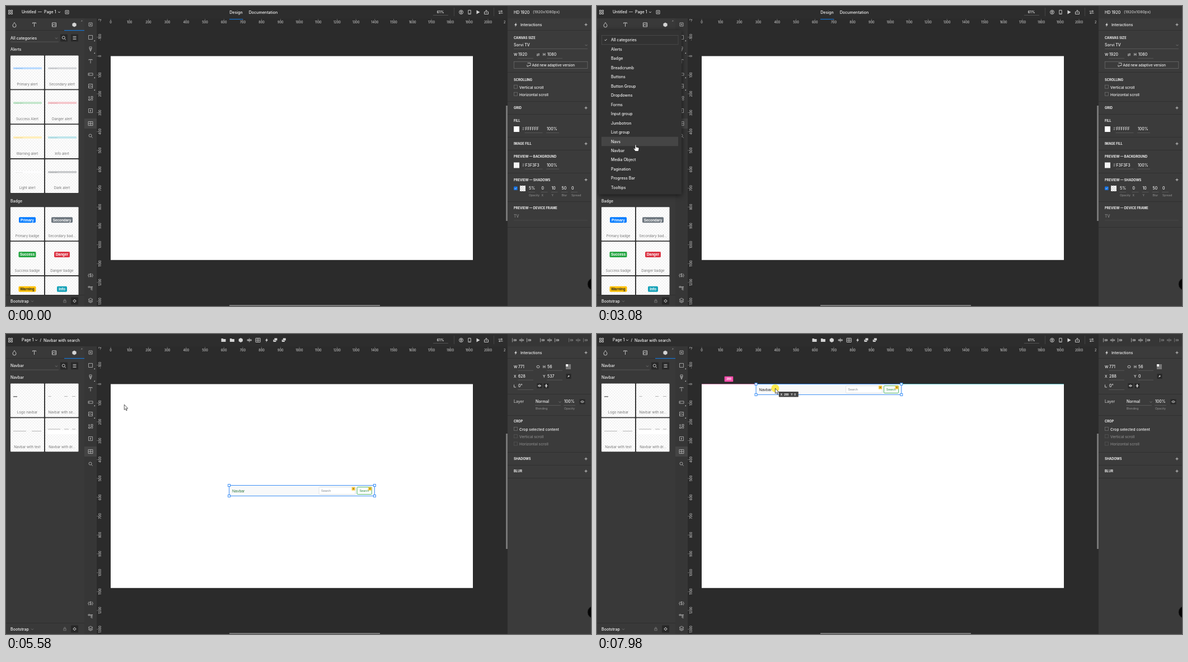
An HTML page that plays this animation: 1045x536 px, repeating every 8000 ms.

```html
<!DOCTYPE html>
<html lang="en">
<head>
<meta charset="utf-8">
<title>Design editor</title>
<style>
html, body { margin: 0; width: 100%; height: 100%; overflow: hidden; background: #2b2b2b; }
svg { display: block; width: 100%; height: 100%; }
text { font-family: Inter, "Open Sans", sans-serif; font-weight: 500; fill: #f4f4f4; white-space: pre; }
.dim { fill: #8b8b8b; }
.soft { fill: #c4c4c4; }
.off { fill: #888; }
.bold { font-weight: 700; }
.mid { text-anchor: middle; }
.tile { fill: #777; text-anchor: middle; font-weight: 400; }
.ui { font-family: "Liberation Sans", Arial, sans-serif; font-weight: 400; }
.ui.bold { font-weight: 700; }
.i { fill: none; stroke: #d4d4d4; stroke-width: .9; }
.f { fill: #d4d4d4; stroke: none; }
.muted { opacity: .75; }
.faint { opacity: .4; }
</style>
</head>
<body>
<svg id="stage" viewBox="0 0 1045 536" preserveAspectRatio="none"></svg>
<script>
const LOOP = 8000, STEP = 77.75, FIRST = 125;
const PAGE = { x: 187, y: 89.5, w: 647, h: 364.3 };
const SCALE = PAGE.w / 1920;

const text = (x, y, s, size = 6.9, cls = '', extra = '') =>
  `<text x="${x}" y="${y + size * .36}" font-size="${size}" class="${cls}" ${extra}>${s}</text>`;
const rect = (x, y, w, h, fill, extra = '') =>
  `<rect x="${x}" y="${y}" width="${w}" height="${h}" fill="${fill}" ${extra}/>`;
const icon = (x, y, d, cls = '') => `<path transform="translate(${x} ${y})" d="${d}" class="i ${cls}"/>`;
const group = (id, body, extra = '') => `<g id="${id}" ${extra}>${body}</g>`;
const range = n => [...Array(n).keys()];

const D = {
  grid: 'M-3.5-3.5h2.7v2.7h-2.7zM.8-3.5h2.7v2.7h-2.7zM-3.5.8h2.7v2.7h-2.7zM.8.8h2.7v2.7h-2.7z',
  chevron: 'M-2-1L0 1L2-1',
  plus: 'M-2.5 0h5M0-2.5v5',
  box: 'M-3.5-3.5h7v7h-7z',
  plusBox: 'M-3-3h6v6h-6zM-1.5 0h3M0-1.5v3',
  bolt: 'M1-4L-2.5 .7H-.3L-1 4L2.5-.9H.4z',
  drop: 'M0-4C2-1 3 0 3 1.5a3 3 0 0 1-6 0C-3 0-2-1 0-4z',
  type: 'M-3-2v-1.5h6V-2M0-3.5v7',
  image: 'M-3.5-3.5h7v7h-7zM-3.5 2l2.5-3l2 2l1-1l1.5 1.5M1-2h.8',
  hex: 'M0-4L3.6-2V2L0 4L-3.6 2V-2z',
  search: 'M2-.5a2.5 2.5 0 1 1-5 0a2.5 2.5 0 0 1 5 0M1.3 1.3L3.7 3.7',
  menu: 'M-3-2.5h6M-3 0h6M-3 2.5h6',
  person: 'M3.5 0a3.5 3.5 0 1 1-7 0a3.5 3.5 0 0 1 7 0M-2-1h4M0-2.3v2.5L-1.3 2.5M0 .2L1.3 2.5',
  phone: 'M-2.2-3.5h4.4v7h-4.4zM-.6 2.3h1.2',
  play: 'M-2.5-3.5L3.5 0L-2.5 3.5z',
  share: 'M-1.5-.5h-2v4h7v-4h-2M0 1.5v-5M-1.8-1.8L0-3.6L1.8-1.8',
  sliders: 'M-4-1.7h7M1.2-3.3L3-1.7L1.2 0M4 1.7h-7M-1.2.2L-3 1.7L-1.2 3.3',
  pen: 'M-2-4h4v3L0 4L-2-1zM-2-1h4M0-1v3',
  field: 'M-4-2h8v4h-8zM-2.5-.8v1.6',
  shapes: 'M-4-3.5L-1-.8M-1-3.5L-4-.8M1-3.5h3v3h-3zM-3.5 1h3v2.5h-3zM4 2.2a1.4 1.4 0 1 1-2.8 0a1.4 1.4 0 0 1 2.8 0',
  cells: 'M-4-3.5h8v7h-8zM0-3.5v7M-4 0h8',
  tree: 'M-4-3h3v2h-3zM1-2h3M-1-2h5M1-2V3h3M1 .5h3',
  layers: 'M0-4L4-1.7L0 .5L-4-1.7zM-4 .3L0 2.5L4 .3M-4 2L0 4.2L4 2',
  folder: 'M-4-3h3l1 1h4v5h-8z',
  copies: 'M-1.5-3.5h5v4h-5zM-3.5-1h1.5v2h3.5v2h-5z',
  align: 'M-3.5-3.5v7M-1.5 0h5M-1.5-1.2h5v2.4h-5',
  center: 'M0-3.5v7M-3.5-1h2.3v2h-2.3zM1.2-1h2.3v2h-2.3z',
  eye: 'M-3 0Q0-3.2 3 0Q0 3.2-3 0M-.6 0h1.2',
  lock: 'M-2.2-.3h4.4v3h-4.4zM-1.3-.3v-1.4a1.3 1.3 0 0 1 2.6 0v1.4',
  gear: 'M2 0a2 2 0 1 1-4 0a2 2 0 0 1 4 0M0-3v1M0 2v1M-3 0h1M2 0h1',
  swap: 'M-2.5-1h5L1-2.5M2.5 1h-5L-1 2.5',
  link: 'M-2.5 0a2 1.7 0 0 1 5 0a2 1.7 0 0 1-5 0'
};

const rule = (x1, x2, y, color = '#626262') => rect(x1, y, x2 - x1, .7, color);
const darkBox = (x, y) => rect(x, y, 13, 13, '#282828', 'rx="1"');
const field = (x, y, value, w, id = '') => text(x, y, value, 6.9, '', id && `id="${id}"`) + rule(x - 1, x + w, y + 6.3);
const check = (y, label, cls = '') =>
  rect(907.4, y - 4, 6, 6, 'none', 'stroke="#777" stroke-width=".7"' + (cls ? ' opacity=".5"' : '')) + text(917, y, label, 6.7, cls);
const heading = (y, label, plus) => text(907, y, label, 5.75, 'bold') + (plus ? icon(1036, y, D.plus) : '');
const dividers = ys => ys.map(y => rect(896, y, 149, 1, '#303030')).join('');

function workspace() {
  const rulerX = range(21).map(n => {
    const x = PAGE.x + n * 100 * SCALE;
    return rect(x - .3, 23, .7, 3, '#777') + text(x, 29.5, n * 100, 5.5, 'soft mid');
  }).join('') + text(889, 29.5, '2', 5.5, 'soft');
  const rulerY = range(16).map(i => {
    const n = i - 2, y = PAGE.y + n * 100 * SCALE;
    return rect(162, y - .3, 3, .7, '#777') +
      text(0, 0, n * 100, 5.5, 'soft mid', `transform="translate(168.5 ${y})rotate(-90)"`);
  }).join('');
  return rect(0, 0, 1045, 536, '#2b2b2b') + rulerX + `<g clip-path="url(#below)">${rulerY}</g>` +
    rect(PAGE.x, PAGE.y, PAGE.w, PAGE.h, '#fff') +
    rect(893, 178, 3, 206, '#777') + rect(399, 534, 269, 2, '#777');
}

function toolbar() {
  const tools = [[33, 'plusBox'], [56, 'box'], [77, 'pen'], [99, 'type'], [122, 'field'], [143, 'image'],
    [165, 'shapes'], [187, 'box'], [210, 'cells'], [232, 'search'], [504, 'tree'], [526, 'layers']];
  return rect(140, 22, 22, 514, '#363636') + rect(140, 201, 22, 18, '#444') +
    tools.map(([y, name]) => icon(151, y, D[name], 'muted')).join('') + icon(151, 187, 'M.8-2L-1 .3H1L-.8 2', 'muted') +
    text(151, 482, '{$}', 6.9, 'mid soft') +
    [62, 84, 128, 150].map(y => icon(158, y, 'M-1 1h2v-2z', 'f')).join('');
}

function topBar() {
  const shared = rect(0, 0, 896, 22, '#2d2d2d') + icon(8, 11, D.grid) +
    text(776, 11, '61%', 6.2, 'mid') + rule(763, 790, 16) +
    rect(800, 3, 1, 15, '#444') + rect(871, 3, 1, 15, '#444') +
    icon(813, 11, D.person) + icon(828, 11, D.phone) + icon(843, 11, D.play, 'f') +
    icon(858, 11, D.share) + icon(883.5, 11, D.sliders);
  const idle = text(28, 11, 'Untitled') + text(57, 11, '—') + text(68, 11, 'Page 1') +
    icon(95, 11, D.chevron) + icon(109, 11, D.plusBox) +
    text(411, 11, 'Design', 7.1, 'mid') + text(459.5, 11, 'Documentation', 7.1, 'mid') +
    rect(399, 23, 24, 1.2, '#1474d4');
  const actions = ['folder', 'folder', 'hex', 'center', 'cells', 'bolt', 'copies', 'copies'];
  const picked = text(28, 11, 'Page 1') + icon(54, 11, D.chevron) + text(60.5, 11, '/') +
    text(67, 11, 'Navbar with search', 7) +
    actions.map((a, i) => icon(388.5 + i * 15.4, 11, D[a], a === 'center' || a === 'cells' ? '' : 'f')).join('');
  return shared + group('topIdle', idle) + group('topPicked', picked);
}

const tile = (col, row, top, label) => {
  const x = 8 + col * 62, y = top + row * 61.8;
  return rect(x, y, 60 - col * .5, 60, 'url(#checker)', 'rx="1"') + text(x + 30, y + 51.3, label, 6.15, 'tile');
};

function leftPanel() {
  const alerts = [['Primary alert', '#b8daff', '#5b8fc4'], ['Secondary alert', '#d6d8db', '#8a8d90'],
    ['Success Alert', '#c3e6cb', '#71a97f'], ['Danger alert', '#f5c6cb', '#c07a82'],
    ['Warning alert', '#ffeeba', '#c9ad5e'], ['Info alert', '#bee5eb', '#6ba5ae'],
    ['Light alert', '#fdfdfe', '#c4c4c4'], ['Dark alert', '#c6c8ca', '#77797b']];
  const badges = [['Primary', '#007bff', 30], ['Secondary', '#6c757d', 38], ['Success', '#28a745', 31],
    ['Danger', '#dc3545', 28], ['Warning', '#ffc107', 31], ['Info', '#17a2b8', 18]];
  const all = text(8, 57, 'All categories', 7.2) + text(8, 78, 'Alerts') + text(8, 349, 'Badge') +
    alerts.map(([label, color, ink], i) => {
      const col = i % 2, row = i >> 1, x = 13 + col * 62, y = 109.5 + row * 61.8;
      return tile(col, row, 88.5, label) + rect(x, y, 51, 3.6, color, 'rx=".5"') +
        text(x + 1.5, y + 1.8, 'A simple alert', 2.5, 'ui', `style="fill:${ink}"`);
    }).join('') +
    badges.map(([label, color, w], i) => {
      const col = i % 2, row = i >> 1, x = 38 + col * 62, y = 382.2 + row * 61.8;
      const name = label === 'Secondary' ? 'Secondary bad...' : label + ' badge';
      const ink = label === 'Warning' ? '#212529' : '#fff';
      return tile(col, row, 359.3, name) + rect(x - w / 2, y - 5, w, 10, color, 'rx="1.7"') +
        text(x, y, label, 6.4, 'ui bold mid', `style="fill:${ink}"`);
    }).join('');
  const names = ['Logo navbar', 'Navbar with se...', 'Navbar with text', 'Navbar with dr...'];
  const dash = (x, w, y) => rect(x, y, w, 1, '#b4b4b4');
  const previews = rect(13, 111, 7, 1.6, '#777') + dash(75.5, 5, 111) + dash(104, 6, 111) + dash(118, 6, 111) +
    dash(13, 23, 173) + dash(46, 17, 173) + rect(71, 172, 58, 7, '#fff') +
    dash(75, 22, 169.5) + dash(104, 8, 169.5) + dash(118, 6, 169.5);
  const navbars = text(8, 57, 'Navbar') + text(8, 78, 'Navbar') +
    names.map((n, i) => tile(i % 2, i >> 1, 88.5, n)).join('') + group('previews', previews);
  return rect(0, 22, 140, 514, '#393939') + group('allTiles', all) + group('navTiles', navbars) +
    icon(15, 33.5, D.drop) + icon(50.5, 33.5, D.type) + icon(86, 33.5, D.image) + icon(122, 33.5, D.hex, 'f') +
    icon(135, 27, 'M-1 1L1-1M-.5-1H1V.5', 'faint') +
    rect(0, 43, 140, .8, '#2b2b2b') + rect(104, 43, 36, 1.2, '#1474d4') +
    rule(8, 94, 63.7) + icon(90, 57.5, D.chevron, 'faint') +
    darkBox(97, 50.5) + icon(103.3, 57, D.search) + darkBox(116, 50.5) + icon(122.5, 57, D.menu) +
    rect(0, 516, 140, 20, '#393939') + rect(0, 516, 140, .8, '#2e2e2e') +
    text(8, 527, 'Bootstrap', 7.1) + icon(47, 527.5, D.chevron, 'faint') +
    icon(105, 527, D.lock, 'faint') + darkBox(116, 520.5) + icon(122.5, 527, D.gear);
}

function rightPanel() {
  const swatch = (y, color, hex) => rect(907, y - 5, 10, 10, color) + text(922, y, '#', 6.9, 'dim') +
    field(927.5, y, hex, 31) + field(966, y, '100%', 22);
  const shadow = [[934, '5%', 'Opacity'], [956.5, '0', 'X'], [974.5, '10', 'Y'], [992.5, '50', 'Blur'], [1010, '0', 'Spread']];
  const idle = text(907, 11, 'HD 1920', 7) + text(941, 11, '(1920x1080px)', 6.8, 'soft') +
    heading(56.5, 'CANVAS SIZE') + text(907, 69.5, 'Sorvi TV', 7) + rule(907, 1039, 76) +
    icon(1036.5, 70, D.chevron, 'faint') +
    text(907, 87, 'W', 6.4) + field(915, 87, '1920', 27) + icon(950.5, 87, D.swap) +
    text(959, 87, 'H', 6.4) + field(967, 87, '1080', 27) +
    rect(907.3, 99.3, 131.5, 12.3, 'none', 'stroke="#707070" stroke-width=".7"') +
    icon(934, 105, 'M-2.5-3h5.5v4.5h-4M-3 0v3h2.5') + text(939.5, 105.3, 'Add new adaptive version', 6.2) +
    heading(132, 'SCROLLING') + check(145.2, 'Vertical scroll') + check(158.2, 'Horizontal scroll') +
    heading(182, 'GRID', 1) + heading(204.5, 'FILL') + swatch(220, '#fff', 'FFFFFF') +
    heading(246, 'IMAGE FILL', 1) + heading(269, 'PREVIEW — BACKGROUND') + swatch(284.5, '#f3f3f3', 'F3F3F3') +
    heading(310.5, 'PREVIEW — SHADOWS', 1) + rect(907, 322.5, 6.6, 6.6, '#1474e8', 'rx="1"') +
    icon(910.3, 325.8, 'M-1.7 0L-.5 1.3L1.8-1.3') + rect(918, 321, 10, 10, 'url(#checkerDark)') +
    shadow.map(([x, v, l]) => field(x, 326, v, 11) + text(x, 338, l, 5.1, 'dim')).join('') +
    heading(361, 'PREVIEW — DEVICE FRAME') + text(907, 376, 'TV', 6.9, 'dim') + rule(907, 1039, 382.5, '#4c4c4c') +
    dividers([118, 170, 193, 234, 257, 298, 349, 395]);
  const aligns = [908, 921, 934, 958, 971, 984, 1009, 1022, 1035];
  const picked = aligns.map((x, i) => icon(x, 11, D[i % 3 === 1 ? 'center' : 'align'], i > 5 ? 'faint' : 'muted')).join('') +
    text(907, 58.5, 'W', 6.4) + field(915, 58.5, '771', 27) + icon(950.5, 58.5, D.link) +
    text(959, 58.5, 'H', 6.4) + field(967, 58.5, '56', 27) +
    rect(1000, 54, 9, 9, '#777') + rect(1000, 54, 4, 4, '#fff') +
    text(907, 75.5, 'X', 6.4) + field(915, 75.5, '628', 27, 'valueX') +
    text(959, 75.5, 'Y', 6.4) + field(967, 75.5, '537', 27, 'valueY') +
    rect(1000.5, 71, 9, 9, '#282828') + icon(1005, 75.5, 'M-2 2L0-2L2 0z', 'f') +
    icon(909, 93, 'M-1.5-2.5V2H2') + field(915, 92.7, '0°', 27) +
    rect(948.5, 88, 9, 9, '#282828') + icon(953, 92.5, 'M0-2.5v5M-1-1L-3 0L-1 1zM1-1L3 0L1 1z') +
    rect(960.5, 88, 9, 9, '#282828') + icon(965, 92.5, 'M-2.5 0h5M-1-1L0-3L1-1zM-1 1L0 3L1 1z') +
    text(907, 121, 'Layer', 6.9, 'soft') + field(946, 121, 'Normal', 45) + icon(989.5, 121.5, D.chevron, 'faint') +
    field(997, 121, '100%', 20) + rect(1024.5, 116.5, 10, 9, '#282828') + icon(1029.5, 121, D.eye) +
    text(946, 133, 'Blending', 5.1, 'dim') + text(997, 133, 'Opacity', 5.1, 'dim') +
    heading(156, 'CROP') + check(170.5, 'Crop selected content') +
    check(183.7, 'Vertical scroll', 'off') + check(197, 'Horizontal scroll', 'off') +
    heading(223, 'SHADOWS', 1) + heading(245, 'BLUR', 1) + dividers([107, 145, 211, 234, 257]);
  return rect(896, 0, 149, 536, '#3b3b3b') + rect(896, 0, 149, 22, '#363636') + rect(896, 43, 149, 1, '#303030') +
    icon(910.5, 33.5, D.bolt, 'f') + text(919, 33.3, 'Interactions', 6.8) + icon(1036, 33.3, D.plus) +
    group('panelIdle', idle) + group('panelPicked', picked) +
    '<circle cx="1050" cy="497" r="11" fill="#050505" stroke="#222"/>';
}

const ITEMS = ['All categories', 'Alerts', 'Badge', 'Breadcrumb', 'Buttons', 'Button Group', 'Dropdowns', 'Forms',
  'Input group', 'Jumbotron', 'List group', 'Navs', 'Navbar', 'Media Object', 'Pagination', 'Progress Bar', 'Tooltips'];
const ROW = 16.48, ROW_TOP = 60.7;

const dropdown = () => group('dropdown',
  rect(3, 43, 148, 293.5, '#323232', 'filter="url(#shade)"') + rect(8, 0, 137, ROW, '#454545', 'id="hover"') +
  rect(8.4, 52.5, 136.6, 16.3, 'none', 'stroke="#505050" stroke-width=".7"') + icon(15.5, 60.5, 'M-2 0L-.5 1.5L2-1.5') +
  ITEMS.map((s, i) => text(25, ROW_TOP + i * ROW, s, 7)).join(''));

function navbarItem() {
  const w = 771 * SCALE, h = 56 * SCALE;
  const flag = (x, y) => rect(x, y, 6, 6, '#f8c739', 'rx=".5"') +
    `<path transform="translate(${x + 3} ${y + 3})scale(.5)" d="${D.bolt}" fill="#5c4a12"/>`;
  const handle = (x, y) => rect(x - 2, y - 2, 4, 4, '#fff', 'stroke="#3a8ef5"');
  return group('item', rect(0, 0, w, h, '#f8f9fa', 'stroke="#3a8ef5"') +
    text(5.5, 9.6, 'Navbar', 6.9, 'ui', 'id="brand"') +
    rect(160.5, 3, 65, 13, '#fff', 'stroke="#d5dade" stroke-width=".7" rx="1.3"') +
    text(164.5, 9.6, 'Search', 5.4, 'ui', 'style="fill:#7c838a"') + flag(219, 3) +
    rect(228.5, 3, 26, 13, '#fdfefd', 'stroke="#28a745" stroke-width=".8" rx="1.3"') +
    text(232.8, 9.6, 'Search', 5.4, 'ui', 'style="fill:#28843d"') + flag(248.5, 3) +
    handle(0, 0) + handle(w, 0) + handle(0, h) + handle(w, h));
}

const dragHints = () =>
  group('guides', rect(PAGE.x, 0, 0, 1, '#ff6fc0', 'id="guideLeft"') + rect(0, 0, 0, 1, '#22dbe8', 'id="guideRight"')) +
  group('distance', rect(-7.8, -13.8, 15.5, 9.6, '#ff4fae', 'rx=".7"') + text(0, -9, '', 5.2, 'ui bold mid', 'id="distanceText"')) +
  group('tip', rect(0, 0, 35, 9.4, '#444', 'rx=".7" id="tipBox"') + text(3, 4.8, '', 5, 'ui bold', 'id="tipText"'));

const pointer = () => group('cursor',
  '<circle id="press" r="7" fill="#ffe62e" opacity=".85"/>' +
  '<path id="arrow" d="M0 0V9.3L2.1 7.4L3.6 10.7L5 10L3.6 6.9H6.4z" fill="#fff" stroke="#111" stroke-width=".7"/>' +
  '<path id="hand" d="M-1 0Q0-1 1 0V4L5 5Q6.3 5.3 6 7L5 11.5H-.5L-3.7 7.2Q-3.8 5.8-2.4 6.2L-1 7.4z" fill="#fff" stroke="#111" stroke-width=".7"/>');

const checker = (id, size, color) => `<pattern id="${id}" width="${size}" height="${size}" patternUnits="userSpaceOnUse">` +
  rect(0, 0, size, size, '#fff') + rect(0, 0, size / 2, size / 2, color) + rect(size / 2, size / 2, size / 2, size / 2, color) + '</pattern>';

document.getElementById('stage').innerHTML = '<defs>' + checker('checker', 5, '#f3f3f3') + checker('checkerDark', 4, '#cfcfcf') +
  '<clipPath id="below"><rect x="160" y="23" width="20" height="513"/></clipPath>' +
  '<filter id="shade" x="-20%" y="-20%" width="140%" height="140%" color-interpolation-filters="sRGB">' +
  '<feDropShadow dx="0" dy="2" stdDeviation="5" flood-opacity=".6"/></filter></defs>' +
  workspace() + toolbar() + leftPanel() + topBar() + rightPanel() + navbarItem() + dragHints() + dropdown() + pointer();

const el = Object.fromEntries([...document.querySelectorAll('[id]')].map(e => [e.id, e]));
const show = (id, on) => { el[id].style.display = on ? '' : 'none'; };
const move = (id, x, y) => el[id].setAttribute('transform', `translate(${x} ${y})`);
const set = (id, attrs) => { for (const a in attrs) el[id].setAttribute(a, attrs[a]); };

// Pointer path: time, x, y
const PATH = [[125, 915, 511], [290, 790, 420], [520, 420, 220], [700, 200, 110], [910, 110, 70], [1300, 90, 66],
  [1680, 79, 61], [1850, 79, 62], [2010, 77, 72], [2400, 77, 72], [2700, 74, 130], [2900, 71, 205], [3079, 69, 248],
  [3200, 69, 248], [3480, 68, 257], [3860, 68, 257], [4200, 80, 200], [4500, 93, 150], [4790, 98, 124], [5420, 98, 124],
  [5567, 211, 126], [5850, 340, 190], [6100, 415, 255], [6270, 433, 277], [6500, 432, 272], [6656, 427, 259.1],
  [6733, 421, 237], [6900, 400, 185], [7130, 362, 112], [7400, 335, 101], [7750, 320, 97], [7825, 320, 97], [7900, 318.4, 97], [8000, 318.4, 97]];

function pointAt(t) {
  const i = Math.max(1, PATH.findIndex(p => p[0] >= t));
  const [a, b] = [PATH[i - 1], PATH[i]];
  const f = Math.max(0, (t - a[0]) / (b[0] - a[0]));
  return [a[1] + (b[1] - a[1]) * f, a[2] + (b[2] - a[2]) * f];
}

function drawDrag(t, dragging) {
  let X = 628, Y = 537;
  // The dragged item trails the pointer by one step.
  const [px, py] = pointAt(t - STEP);
  if (dragging) {
    X = Math.round((px - 34.3 - PAGE.x) / SCALE);
    Y = Math.round((py - 6.5 - PAGE.y) / SCALE);
    if (Y < 25) Y = 0;
  }
  const left = PAGE.x + X * SCALE, top = PAGE.y + Y * SCALE, right = left + 771 * SCALE;
  move('item', left, top);
  el.brand.style.fill = dragging ? '#222' : '#2f7842';
  el.valueX.textContent = X;
  el.valueY.textContent = Y;

  const guided = dragging && (Y === 0 || Math.abs(Y - 484) < 5);
  const guideY = Y ? PAGE.y + PAGE.h / 2 : PAGE.y;
  const settled = t > 7130;
  show('guides', guided);
  show('distance', guided);
  show('tip', dragging);
  el.guides.style.opacity = Y ? 1 : .5;
  set('guideLeft', { y: guideY - .5, width: left - PAGE.x });
  set('guideRight', { x: Y ? left : right, y: guideY - .5, width: PAGE.x + PAGE.w - (Y ? left : right) });
  move('distance', (PAGE.x + left) / 2, guideY);
  move('tip', px + 6.4, py + 6);
  el.distanceText.textContent = settled ? X : '';
  el.tipText.textContent = settled ? `X  ${X}   Y  ${Y}` : '';
  el.tipBox.setAttribute('width', 35 + 3.5 * (String(Y).length - 1));
}

function render(ms) {
  const k = Math.floor((ms - FIRST) / STEP);
  const t = FIRST + k * STEP;
  const within = (a, b) => ms >= a && ms < b;
  const [x, y] = pointAt(t);
  const navbars = ms >= 3710, picked = ms >= 5500, dragging = ms >= 6335;

  show('allTiles', !navbars);
  show('navTiles', navbars);
  show('previews', ms >= 4090);
  show('topIdle', !picked);
  show('topPicked', picked);
  show('panelIdle', !picked);
  show('panelPicked', picked);
  show('dropdown', within(1765, 3630));
  el.hover.setAttribute('y', ROW_TOP - ROW / 2 + ROW * Math.round((y - ROW_TOP) / ROW));

  show('item', ms >= 5325);
  drawDrag(t, dragging);

  const hand = within(1060, 3785) || within(4640, 5500);
  show('cursor', k >= 0);
  show('hand', hand);
  show('arrow', !hand);
  show('press', within(5095, 5260) || dragging);
  move('cursor', x, y);
}

const start = performance.now();
function tick() {
  render((performance.now() - start) % LOOP);
  requestAnimationFrame(tick);
}
tick();
</script>
</body>
</html>
```
